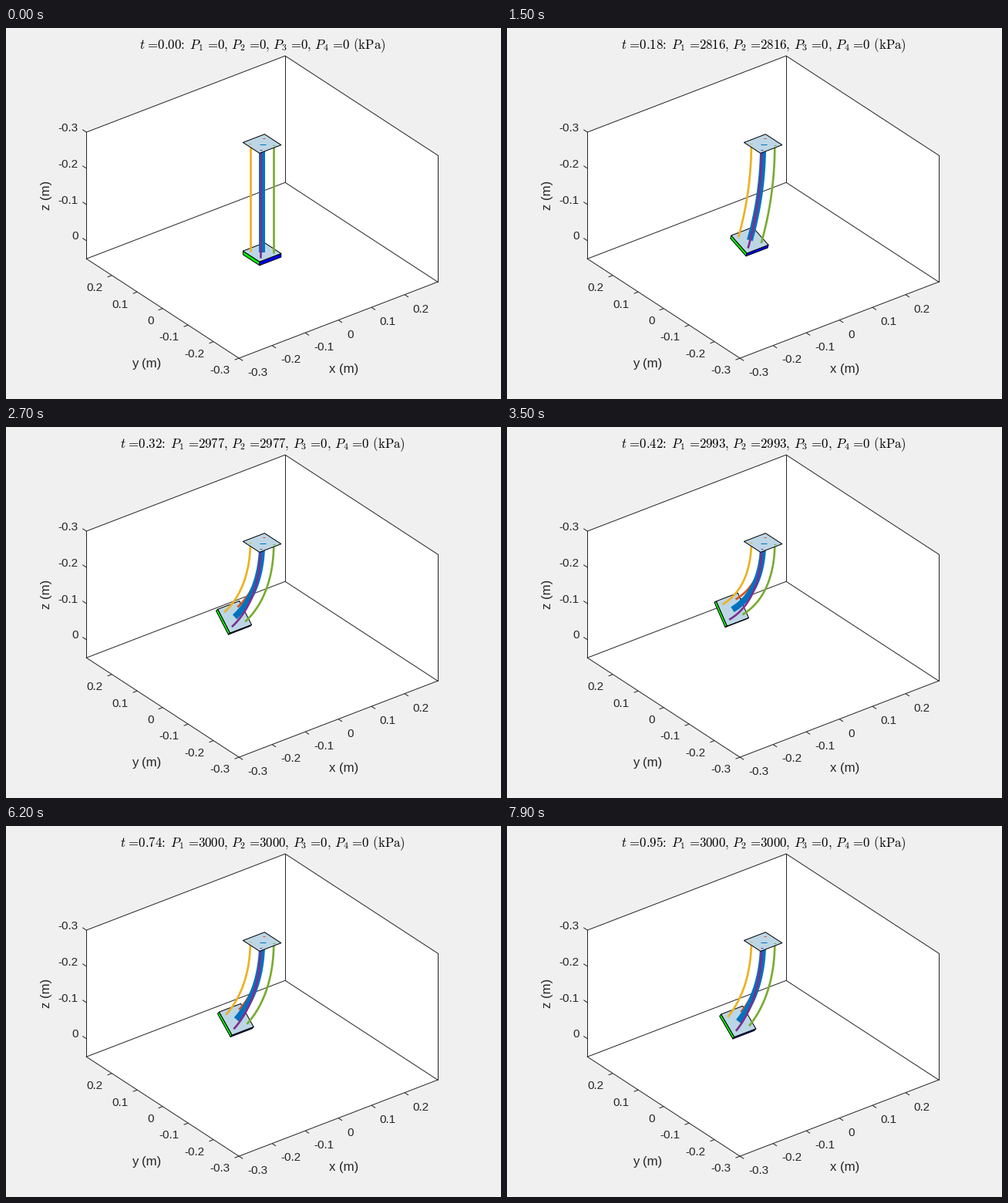
Animation, 642 px wide and 481 px high, one loop 8000 ms. Source, as a matplotlib script:

```python
import numpy as np
import matplotlib.pyplot as plt
from matplotlib.animation import FuncAnimation
from matplotlib.patches import Polygon

W, H, DPI = 642, 481, 64
PT = 72 / DPI                     # points per pixel
FRAMES, STEP = 80, 0.012          # frames per loop, simulated seconds per frame
INK = "#262626"
BLUE, ORANGE, YELLOW, PURPLE, GREEN = (
    "#0072BD", "#D95319", "#EDB120", "#7E2F8E", "#77AC30")
PLATE = "#BCD6E6"
TICK_SIZE, LABEL_SIZE, TITLE_SIZE = 15.25, 16.75, 16.8

# Orthographic view: azimuth -37.5, elevation 30 degrees, z pointing down
SCALE = 541.6
AZ, EL = np.radians([37.5, 30])
ORIGIN = np.array([331.6, 290.25])
AXES = SCALE * np.array([[np.cos(AZ), -np.sin(AZ) * np.sin(EL)],
                         [-np.sin(AZ), -np.cos(AZ) * np.sin(EL)],
                         [0, np.cos(EL)]])
TO_VIEWER = np.array([-np.sin(AZ) * np.cos(EL), -np.cos(AZ) * np.cos(EL),
                      -np.sin(EL)])

LENGTH, HALF, THICK, ARM = 0.3, 0.0325, 0.01, 0.02
LIM, Z_LOW = 0.3, 0.05

# Bending angle of the arm (rad) over the frames
KEY_T = np.array([0, 9, 15, 18, 27, 35, 38, 45, 50, 54, 62, 72, 79])
KEY_A = np.array([0, .11, .355, .47, .80, .93, .94, .895,
                  .85, .80, .738, .69, .70])
SLOPE = np.gradient(KEY_A, KEY_T)
SLOPE[0] = SLOPE[-1] = 0


def project(points):
    return ORIGIN + np.asarray(points, float) @ AXES


def bend_angle(i):
    k = min(np.searchsorted(KEY_T, i, side="right"), len(KEY_T) - 1) - 1
    h = KEY_T[k + 1] - KEY_T[k]
    s = (i - KEY_T[k]) / h
    return ((2*s**3 - 3*s**2 + 1) * KEY_A[k] + (3*s**2 - 2*s**3) * KEY_A[k + 1]
            + h * ((s**3 - 2*s**2 + s) * SLOPE[k] + (s**3 - s**2) * SLOPE[k + 1]))


def pressure(t):
    rate = np.interp(t, [0, .18, .324, .42, .6, .95],
                     [16, 15.507, 15.034, 14.43, 13.4, 12])
    return 3000 * (1 - np.exp(-rate * t))


def title_text(t):
    p = f"{pressure(t):.0f}"
    eq = r"\hspace{0.117}=\hspace{-0.2}"
    parts = [rf"P_{n}{eq}\mathrm{{{v}}}" for n, v in enumerate([p, p, 0, 0], 1)]
    return (rf"$t{eq}\mathrm{{{t:.2f}}}\hspace{{-0.2}}:\hspace{{0.3}}"
            + r",\hspace{0.18}".join(parts) + r"\hspace{0.38}\mathrm{(kPa)}$")


def backbone(theta):
    """Positions (y, z) and tilt along the arm, from the fixed top plate down."""
    u = np.linspace(0, 1, 41)
    tilt = 0.92 * theta * (u + 0.26 * u * (1 - u))
    ds = (LENGTH - 0.027 * theta**2) / 40

    def run(f):
        return np.concatenate([[0], np.cumsum((f[1:] + f[:-1]) / 2 * ds)])

    return run(np.sin(tilt)), run(np.cos(tilt)) - LENGTH, tilt


def strand(a, b, y, z, tilt):
    return np.column_stack([np.full_like(y, a),
                            y + b * np.cos(tilt), z - b * np.sin(tilt)])


plt.rcParams.update({"font.family": "Liberation Sans",
                     "mathtext.fontset": "cm", "axes.unicode_minus": False})
fig = plt.figure(figsize=(W / DPI, H / DPI), dpi=DPI, facecolor="#F0F0F0")
ax = fig.add_axes([0, 0, 1, 1])
ax.set_xlim(-0.5, W - 0.5)
ax.set_ylim(H - 0.5, -0.5)
ax.axis("off")


def line(points, color=INK, width=1.0, z=1, cap="butt"):
    x, y = np.asarray(points).T
    return ax.plot(x, y, color=color, lw=width * PT, zorder=z,
                   solid_capstyle=cap, solid_joinstyle="round")[0]


def face(points, color, z):
    return ax.add_patch(Polygon(points, closed=True, fc=color, ec="black",
                                lw=PT, joinstyle="round", zorder=z))


def tick_label(x, y, s, ha):
    ax.text(x, y, s, ha=ha, va="center_baseline",
            fontsize=TICK_SIZE * PT, color=INK)


def axis_label(x, y, s, rotation=0):
    ax.text(x, y, s, ha="center", va="center", rotation=rotation,
            fontsize=LABEL_SIZE * PT, color=INK)


# Axes box
def corner(x, y, z):
    return project([x * LIM, y * LIM, z])


left, back, right = [(-1, 1), (1, 1), (1, -1)]
hi = [corner(*c, -LIM) for c in (left, back, right)]
lo = [corner(*c, Z_LOW) for c in (left, back, right)]
front = corner(-1, -1, Z_LOW)
ax.add_patch(Polygon([*hi, lo[2], front, lo[0]], fc="white", ec="none", zorder=0))
for path in ([*hi], [*lo], [lo[0], front, lo[2]], *zip(hi, lo)):
    line(path, cap="projecting")


# Ticks point outwards along the neighbouring axis
def tick(point, direction):
    p = project(point)
    d = np.array(direction) @ AXES
    line([p, p + 6 * d / np.hypot(*d)])


for k in range(6):
    v = -0.3 + k / 10
    text = f"{v:.1f}" if k != 3 else "0"
    tick([v, -LIM, Z_LOW], [0, -1, 0])
    tick([-LIM, v, Z_LOW], [-1, 0, 0])
    tick_label(312.7 + 42.9 * k, 444.8 - 16.4 * k, text, "left")
    tick_label(290 - 33 * k, 442.2 - 21.4 * k, text, "right")
    if k < 4:
        tick([-LIM, LIM, v], [0, 1, 0])
        tick_label(93, 127.8 + 46.9 * k, text, "right")

axis_label(437.2, 442, "x (m)")
axis_label(181.2, 435, "y (m)")
axis_label(52.5, 216.5, "z (m)", rotation=90)
title = ax.text(332, 27, "", ha="center", va="baseline",
                fontsize=TITLE_SIZE * PT, color="black")

# Moving plate: corners 0-3 on the upper side, 4-7 below
SQUARE = HALF * np.array([[-1, 1], [1, 1], [1, -1], [-1, -1]])
BODY = np.array([[x, y, z] for z in (0, THICK) for x, y in SQUARE])
SIDES = [((0, 3, 7, 4), [-1, 0, 0], "#00FF00"),
         ((3, 2, 6, 7), [0, -1, 0], "#0000FF"),
         ((0, 1, 2, 3), [0, 0, -1], PLATE)]
sides = [face(np.zeros((4, 2)), color, 3) for _, _, color in SIDES]

# Muscles and the central backbone, back to front
STRANDS = [(ARM, ARM, ORANGE, 2.67), (0, 0, BLUE, 8), (-ARM, ARM, YELLOW, 2.67),
           (ARM, -ARM, GREEN, 2.67), (-ARM, -ARM, PURPLE, 2.67)]
strands = [line([(0, 0)], color, w, 4) for _, _, color, w in STRANDS]

# Fixed top plate with the line ends showing through
face(project([[x, y, -LENGTH] for x, y in SQUARE]), PLATE, 5)
for a, b, color, w in STRANDS:
    cx, cy = np.round(project([a, b, -LENGTH]))
    line([(cx - w / 2, cy), (cx + w / 2, cy)], color, 1, 6)


def draw(i):
    title.set_text(title_text(i * STEP))
    y, z, tilt = backbone(bend_angle(i))
    for artist, (a, b, _, _) in zip(strands, STRANDS):
        artist.set_data(*project(strand(a, b, y, z, tilt)).T)
    c, s = np.cos(tilt[-1]), np.sin(tilt[-1])
    turn = np.array([[1, 0, 0], [0, c, -s], [0, s, c]])
    pts = project(BODY @ turn + [0, y[-1], z[-1]])
    for artist, (idx, normal, _) in zip(sides, SIDES):
        artist.set_xy(pts[list(idx)])
        artist.set_visible(bool(normal @ turn @ TO_VIEWER > 0))
    return [title, *sides, *strands]


anim = FuncAnimation(fig, draw, frames=FRAMES, interval=100,
                     repeat=True, repeat_delay=0, blit=False)
plt.show()
```
